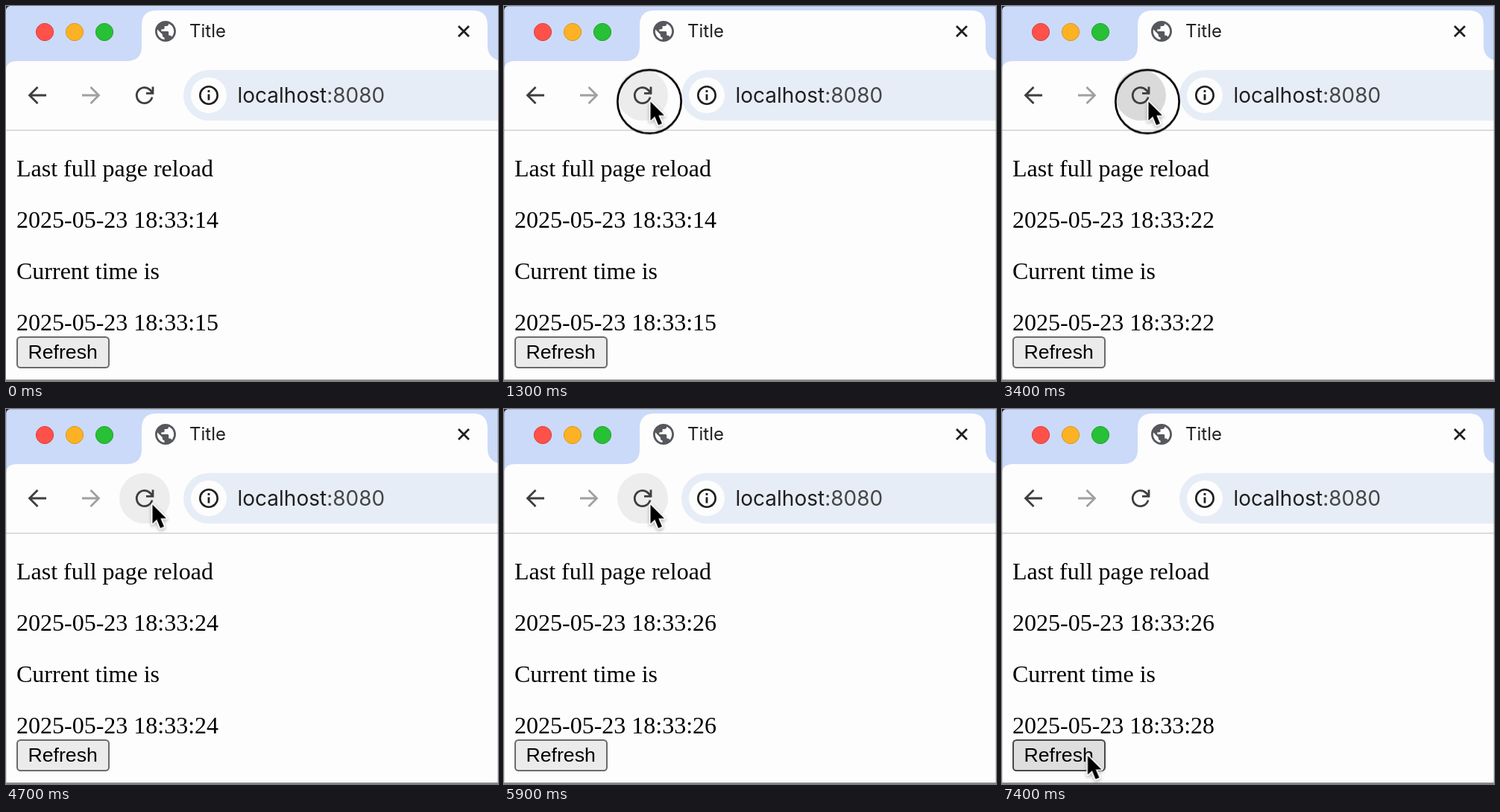
Write an HTML page that moves like this. It is 660 by 504 pixels and loops after 8000 ms.

```html
<!DOCTYPE html>
<html lang="en">
<head>
<meta charset="utf-8">
<title>Page reload</title>
<style>
  html, body { margin: 0; width: 660px; height: 504px; overflow: hidden; background: #fdfdfd; }
  svg { display: block; }
  .ui { font-family: Inter, Roboto, sans-serif; fill: #1f1f1f; }
  .page { font: 32px "Liberation Serif", "Times New Roman", serif; fill: #000; }
  .label { font: 26.67px "Liberation Sans", Arial, sans-serif; fill: #000; }
  .icon { fill: none; stroke: #3c3e41; stroke-width: 2.8; }

  .anim, .t { animation: 8s linear infinite; }
  .t, .step { animation-timing-function: step-end; }

  /* Cursor and click ring */
  .cursor { animation-name: move; }
  @keyframes move {
    0%, 6.25% { transform: translate(720px, 230px); }
    7.5% { transform: translate(540px, 185px); }
    8.75% { transform: translate(345px, 150px); }
    10% { transform: translate(236px, 135.5px); }
    12.5%, 73.75% { transform: translate(195px, 128.5px); animation-timing-function: ease-in-out; }
    80% { transform: translate(116.5px, 465px); }
    82.5%, 100% { transform: translate(113.5px, 466px); }
  }
  .ring { animation-name: ring; }
  @keyframes ring {
    0%, 20%, 45%, 65%, 90%, 100% { opacity: 0; }
    16.25%, 41.25%, 61.25%, 86.25% { opacity: 1; }
  }

  /* Hover and press states */
  .reload { animation-name: reload; }
  @keyframes reload {
    0%, 11.25% { fill: #ededed; opacity: 0; }
    13%, 16.2% { fill: #ededed; opacity: 1; }
    17%, 20% { fill: #dadada; }
    21%, 41.2% { fill: #ededed; }
    42%, 45% { fill: #dadada; }
    46%, 61.2% { fill: #ededed; }
    62%, 65% { fill: #dadada; }
    66%, 75% { fill: #ededed; opacity: 1; }
    77.5%, 100% { fill: #ededed; opacity: 0; }
  }
  .address { animation-name: address; }
  @keyframes address {
    0%, 7.5%, 12.5%, 100% { fill: #e7edf6; }
    9.5%, 10.5% { fill: #e0e6f0; }
  }
  .button { animation-name: button; }
  @keyframes button {
    0% { fill: #ebebeb; stroke: #6b6b6b; }
    78.75%, 90% { fill: #dedede; stroke: #484848; }
    86.25% { fill: #f0f0f0; stroke: #858585; }
  }
  .edge { animation-name: edge; }
  @keyframes edge { 0% { opacity: 0; } 7.5%, 100% { opacity: 1; } }

  /* Seconds shown in turn */
  .first { animation-name: first; }
  .s22 { animation-name: s22; }
  .s24 { animation-name: s24; }
  .s26 { animation-name: s26; }
  .last { animation-name: last; }
  .stay { animation-name: stay; }
  @keyframes first { 0% { opacity: 1; } 20%, 100% { opacity: 0; } }
  @keyframes s22 { 0%, 45%, 100% { opacity: 0; } 20% { opacity: 1; } }
  @keyframes s24 { 0%, 65%, 100% { opacity: 0; } 45% { opacity: 1; } }
  @keyframes s26 { 0%, 90%, 100% { opacity: 0; } 65% { opacity: 1; } }
  @keyframes last { 0% { opacity: 0; } 90%, 100% { opacity: 1; } }
  @keyframes stay { 0% { opacity: 0; } 65%, 100% { opacity: 1; } }
</style>
</head>
<body>
<svg width="660" height="504" viewBox="0 0 660 504">
  <!-- Tab strip -->
  <rect width="660" height="100" fill="#cbdaf9"/>
  <path d="M0 0H5Q1 1 0 5Z" fill="#222"/>
  <path d="M0 168V84Q2 74 14 74H162Q182 74 182 54V26Q182 6 202 6H626Q646 6 646 26V54Q646 68 660 73V168Z" fill="#fdfdfd"/>
  <g stroke-width="1">
    <circle cx="52" cy="35" r="11.6" fill="#fe5149" stroke="#dc3f38"/>
    <circle cx="92" cy="35" r="11.6" fill="#fdb225" stroke="#d9971c"/>
    <circle cx="132" cy="35" r="11.6" fill="#27c037" stroke="#1fa32c"/>
  </g>
  <path transform="translate(197.2 17.2) scale(1.4)" fill="#56585d" d="M12 2C6.48 2 2 6.48 2 12s4.48 10 10 10 10-4.48 10-10S17.52 2 12 2zm-1 17.93c-3.95-.49-7-3.85-7-7.93 0-.62.08-1.21.21-1.79L9 15v1c0 1.1.9 2 2 2v1.93zm6.9-2.54c-.26-.81-1-1.39-1.9-1.39h-1v-3c0-.55-.45-1-1-1H8v-2h2c.55 0 1-.45 1-1V7h2c1.1 0 2-.9 2-2v-.41c2.93 1.19 5 4.06 5 7.41 0 2.08-.8 3.97-2.1 5.39z"/>
  <text class="ui" x="246" y="42" font-size="24">Title</text>
  <path class="icon" style="stroke:#1f1f1f" d="M607 27L621 41M621 27L607 41"/>

  <!-- Toolbar -->
  <path class="icon" d="M54 120H32M42.5 109L31.5 120L42.5 131"/>
  <path class="icon" style="stroke:#a0a0a0" d="M102 120H124M113.500 109L124.500 120L113.500 131"/>
  <circle class="anim reload" cx="186" cy="120" r="34"/>
  <path class="icon" d="M196 122.500A10.500 10.500 0 1 1 193.500 113L197 117M197 108.500V117.300H188"/>
  <path class="anim address" d="M660 86H272A34 34 0 0 0 272 154H660Z"/>
  <circle cx="272" cy="120" r="24" fill="#fdfdfd"/>
  <circle class="icon" cx="272" cy="120" r="11.700" style="stroke:#1f1f1f;stroke-width:2.600"/>
  <path class="icon" style="stroke:#1f1f1f" d="M272 113V116M272 118.500V126.500"/>
  <text class="ui" x="310.500" y="130" font-size="28">localhost<tspan fill="#444746">:8080</tspan></text>
  <rect y="166" width="660" height="2" fill="#dadcdf"/>

  <!-- Page -->
  <g class="page">
    <text x="14" y="229">Last full page reload</text>
    <text x="14" y="298">2025-05-23 18:33:</text>
    <text x="14" y="367">Current time is</text>
    <text x="14" y="436">2025-05-23 18:33:</text>
    <g transform="translate(253 298)">
      <text class="t first">14</text>
      <text class="t s22">22</text>
      <text class="t s24">24</text>
      <text class="t stay">26</text>
    </g>
    <g transform="translate(253 436)">
      <text class="t first">15</text>
      <text class="t s22">22</text>
      <text class="t s24">24</text>
      <text class="t s26">26</text>
      <text class="t last">28</text>
    </g>
  </g>
  <rect class="t button" x="15" y="445" width="123" height="41" rx="4.500" stroke-width="2"/>
  <text class="label" x="29.500" y="474">Refresh</text>

  <rect y="502" width="660" height="2" fill="#898989"/>
  <path class="t edge" d="M.5 502V5Q.5 .5 6 .5H659.500V502" fill="none" stroke="#000" stroke-opacity=".16"/>

  <g class="anim cursor">
    <circle class="t ring" r="42.700" fill="none" stroke="#000" stroke-width="2.700"/>
    <path d="M1.500 0V25.500L7.300 20L12 31.500L17 29.500L12.300 18.500H20Z" fill="#000" stroke="#fff" stroke-width="3.600" stroke-linejoin="round" paint-order="stroke" style="filter:drop-shadow(0 2px 2px rgba(0,0,0,.3))"/>
  </g>
</svg>
</body>
</html>
```
